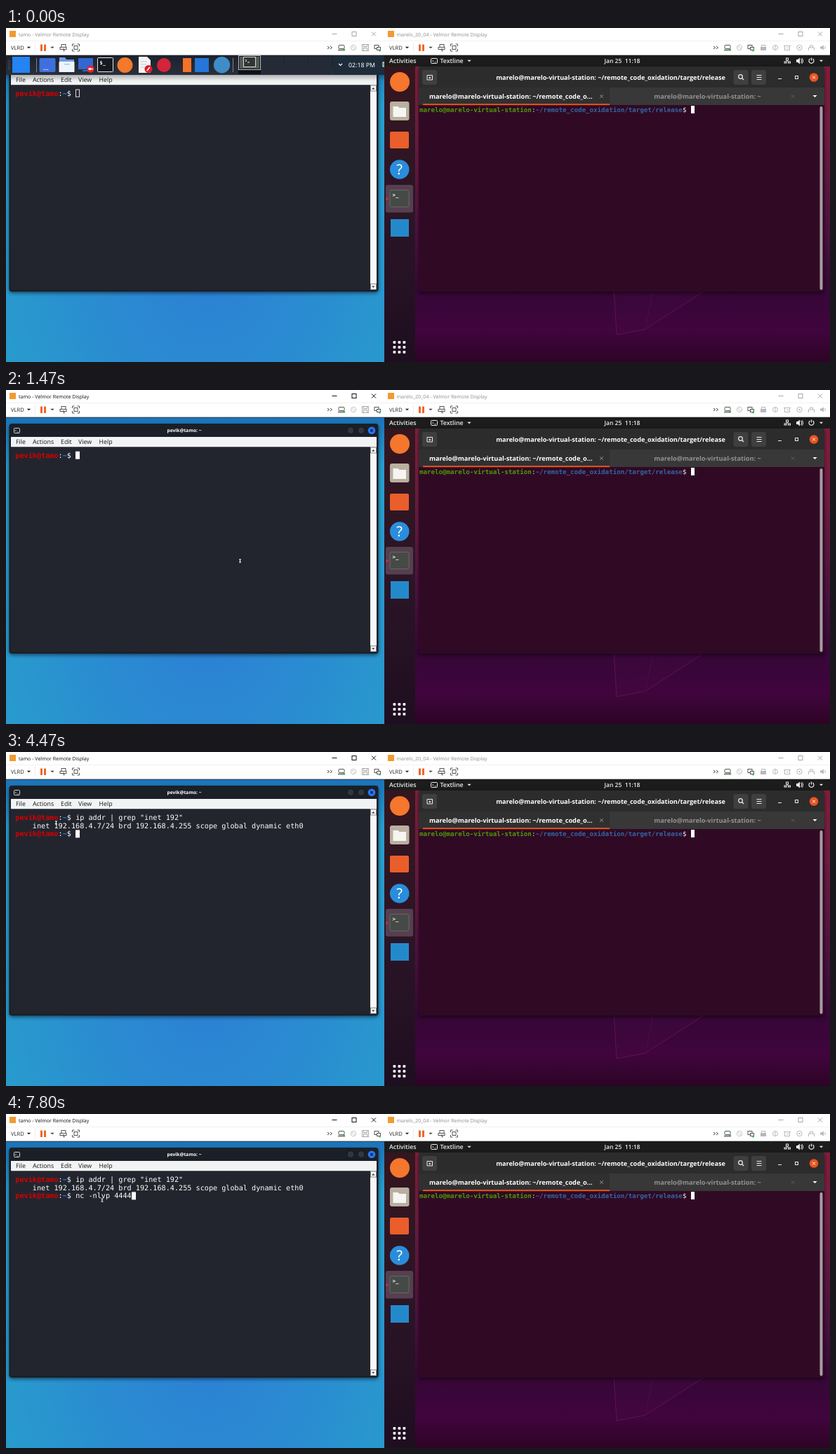
Animation of 1174x477 px, one loop 8 s. Source, as an HTML page:

```html
<!DOCTYPE html>
<html lang="en">
<head>
<meta charset="utf-8">
<title>Two remote desktops</title>
<style>
html, body { margin: 0; width: 100%; height: 100%; overflow: hidden; background: #fff; }
svg { display: block; width: 1174px; height: 477px; text-rendering: geometricPrecision; }
text { white-space: pre; font-family: "Open Sans", "Noto Sans", sans-serif; }
.mono { font-family: "DejaVu Sans Mono", monospace; }
.noto { font-family: "Noto Sans", sans-serif; }
</style>
</head>
<body>
<svg id="stage" viewBox="0 0 1174 477" xmlns="http://www.w3.org/2000/svg"></svg>
<script>
const LOOP = 8000, COL = 6.131, ROW = 11.85, LEFT = 13.3, TOP = 87.3;
const WHITE = '#fff', BODY = '#23252e', RED = '#d60000', BLUE = '#277fff';
const USER = 'pevik@tamo', HOST = 'marelo@marelo-virtual-station', PATH = '~/remote_code_oxidation/target/release';

const rect = (x, y, w, h, fill, more = '') => `<rect x="${x}" y="${y}" width="${w}" height="${h}" fill="${fill}" ${more}/>`;
const box = (x, y, w, h, color, more = '') => rect(x, y, w, h, 'none', `stroke="${color}" ${more}`);
const disc = (x, y, r, fill, more = '') => `<circle cx="${x}" cy="${y}" r="${r}" fill="${fill}" ${more}/>`;
const line = (d, color, w = 1, more = '') => `<path d="${d}" fill="none" stroke="${color}" stroke-width="${w}" ${more}/>`;
const shape = (d, fill) => `<path d="${d}" fill="${fill}"/>`;
const label = (x, y, s, size, fill, more = '') => `<text x="${x}" y="${y}" font-size="${size}" fill="${fill}" ${more}>${s}</text>`;
const down = (x, y, color, r = 2.7) => shape(`M${x - r} ${y - r / 2}h${2 * r}l${-r} ${r}z`, color);
const cross = (x, y, r, color, w = 1) => line(`M${x - r} ${y - r}l${2 * r} ${2 * r}m0 ${-2 * r}l${-2 * r} ${2 * r}`, color, w);
const at = (x, y, body) => `<g transform="translate(${x} ${y})">${body}</g>`;
const bold = 'font-weight="700"', semi = 'font-weight="600"', middle = 'text-anchor="middle"';

const defs = `<defs>
  <radialGradient id="sky" gradientUnits="userSpaceOnUse" cx="285" cy="365" r="320">
    <stop offset="0" stop-color="#2c81d4"/><stop offset=".45" stop-color="#2a8bd1"/><stop offset="1" stop-color="#289dcc"/></radialGradient>
  <linearGradient id="skyTop" x2="0" y2="1"><stop stop-color="#1c72b8"/><stop offset="1" stop-color="#1c72b8" stop-opacity="0"/></linearGradient>
  <linearGradient id="wall" x2="0" y2="1">
    <stop stop-color="#831e38"/><stop offset=".25" stop-color="#721d42"/><stop offset=".6" stop-color="#4a1140"/>
    <stop offset=".78" stop-color="#360737"/><stop offset=".9" stop-color="#40053d"/><stop offset="1" stop-color="#2d0425"/></linearGradient>
  <linearGradient id="dock" x2="0" y2="1"><stop stop-color="#35161f"/><stop offset=".5" stop-color="#2b1527"/><stop offset="1" stop-color="#1e0e20"/></linearGradient>
  <linearGradient id="shade" x2="0" y2="1"><stop stop-color="#000" stop-opacity=".45"/><stop offset="1" stop-color="#000" stop-opacity="0"/></linearGradient>
  <linearGradient id="bar" x2="0" y2="1"><stop stop-color="#1c222d"/><stop offset="1" stop-color="#2a303b"/></linearGradient>
  <filter id="soft" x="-5%" y="-5%" width="110%" height="110%"><feGaussianBlur stdDeviation="2.5"/></filter>
</defs>`;

function controls(x, color) {
  return line(`M${x - 3.5} 8.5h7`, color) + box(x + 25, 5.5, 6, 6, color) + cross(x + 56, 8.5, 3, color);
}

function drive(x, color, dot) {
  return box(x - 4, 24.5, 8, 5, color, 'rx="1"') + line(`M${x - 5} 31.5h10`, color, 1.4) + (dot ? disc(x + 3.5, 31, 1.7, '#4caf50') : '');
}

function screens(x) {
  return box(x - 4, 24.5, 6, 5, '#555') + rect(x - 1, 27, 6, 5, WHITE) + box(x - .5, 27.5, 5, 4, '#555') + disc(x + 3.5, 32, 1.5, '#4caf50');
}

// Host window chrome shared by both viewers
function chrome(x, w) {
  return rect(x, 0, w, 39, WHITE) + line(`M${x} 18.5h${w}`, '#f1f1f1') + rect(x, 38, w, 1, '#b9b9b9')
    + rect(x + 5, 4, 9, 9, '#f29a2e')
    + label(x + 7, 31, 'VLRD', 7.6, '#222') + down(x + 32.5, 28, '#222') + line(`M${x + 41.5} 21v14`, '#eee')
    + rect(x + 49, 23.5, 3, 9.5, '#f0672a') + rect(x + 54, 23.5, 3, 9.5, '#f0672a') + down(x + 66, 28, '#444')
    + box(x + 79, 23.5, 6, 4, '#555') + box(x + 77, 27.5, 9, 3, '#555') + line(`M${x + 82} 29v4l2 -1`, '#555')
    + line(`M${x + 94.5} 26v-3h3m4 0h3v3m0 4v3h-3m-4 0h-3v-3`, '#555') + box(x + 97, 25.5, 5, 5, '#555');
}

const more = x => line(`M${x - 4} 26l2.5 2 -2.5 2m4 -4l2.5 2 -2.5 2`, '#444');
const blocked = x => disc(x, 28, 3.7, 'none', 'stroke="#c4c4c4"') + line(`M${x - 2.5} 25.5l5 5`, '#c4c4c4');

function leftDesk() {
  return rect(0, 39, 539, 438, 'url(#sky)') + rect(0, 39, 539, 70, 'url(#skyTop)') + rect(0, 38, 539, 1.5, '#26323e')
    + rect(4, 50, 527, 329, '#000', 'rx="5" opacity=".45" filter="url(#soft)"') + rect(4.5, 48, 526, 328.5, '#1b1f27', 'rx="4"')
    + box(11.5, 54.5, 8, 7, '#d5d5d5', 'rx="1"') + line('M13 57l1.5 1 -1.5 1m3 1h2', '#d5d5d5', .7)
    + label(254, 60.3, USER + ': ~', 6.7, WHITE, `${semi} ${middle} class="noto"`)
    + [491, 506].map(x => disc(x, 57.7, 5, '#303741', 'stroke="#12151a"')).join('')
    + disc(521, 57.7, 5.3, '#2777ff') + cross(521, 57.7, 1.8, '#10192b', 1.1)
    + rect(7, 67, 521, 14.5, '#f2f3f4')
    + [['File', 14], ['Actions', 38], ['Edit', 78], ['View', 103], ['Help', 132.5]]
      .map(([s, x]) => label(x, 77.2, s, 8.8, '#222', 'class="noto"')).join('')
    + rect(7, 81.5, 512, 292.5, BODY) + rect(519, 81.5, 9, 292.5, '#f9f9f9')
    + box(519.5, 82, 8, 8, '#8c8c8c') + box(519.5, 365.5, 8, 8, '#8c8c8c')
    + shape('M521 87.5h4.6l-2.3 -2.6z', '#333') + down(523.3, 369.7, '#333', 2.3);
}

function taskbar() {
  const cells = [363, 397, 431].map(x => rect(x, 40, 33, 26, '#252b36')).join('');
  return rect(0, 39, 539, 28, 'url(#bar)') + line('M3.5 46v14m2 -14v14', '#515964', 1, 'stroke-dasharray="1 1"')
    + rect(9, 41, 25, 23, '#2583f3') + line('M43.5 43v20', '#7e858e')
    + rect(47.5, 43, 23, 20, '#3e70dd', 'rx="2"') + label(53, 60, '...', 9, WHITE, bold)
    + shape('M76 42h8l2 3h11v18h-21z', '#6f9ee6') + rect(75.5, 48, 22, 15, '#eff4fa', 'rx="1"') + rect(83, 51, 8, 1.5, '#a8c7ec')
    + rect(103, 43, 21, 16, '#3167d2', 'rx="1"') + rect(109, 60, 9, 2, '#3167d2')
    + disc(120.5, 58.5, 5.2, '#df2532') + rect(117.7, 57, 3.8, 3, WHITE) + shape('M121.5 58.5l2 -1.5v3z', WHITE)
    + rect(130.5, 42.5, 22, 20, '#16191f', 'stroke="#e5e5e5" rx="1"') + label(133.5, 52, '$_', 7, WHITE, `${bold} class="mono"`)
    + disc(169.5, 53, 11, '#f3792b')
    + shape('M189 41h12l5 5v18h-17z', '#f4f4f4') + line('M192 48h9m-9 4h8m-8 4h6', '#c9c9c9') + disc(203, 58.5, 5.5, '#d91f2f') + line('M200.8 61l4 -5', WHITE, 1.5)
    + disc(225, 53, 10, '#d3243b') + rect(252, 43, 12, 20, '#f57228') + rect(269, 43, 20, 20, '#2476d9') + disc(307.5, 52.7, 11.7, '#3f8cc9')
    + line('M323.5 43v20', '#7e858e') + cells
    + rect(331, 39, 32, 27, '#0f1217') + box(331.5, 39.5, 31, 20, '#bdbdbd') + rect(333, 41, 28, 17, '#555a57')
    + rect(338.5, 41.5, 17, 14, '#303634', 'stroke="#d6d6d6"') + line('M341 45l2 1.5 -2 1.5m3 1h3', WHITE, .9)
    + rect(466, 39, 73, 28, '#1e2c3a') + line('M474 51l2.5 2.5 2.5 -2.5', WHITE, 1.2)
    + label(488, 56, '02:18 PM', 8.8, WHITE, 'class="noto"') + rect(537, 49, 2, 6, 'none', 'stroke="#fff"')
    + rect(0, 67, 539, 9, 'url(#shade)', 'opacity=".6"');
}

function rightTools() {
  const g = '#b8b8b8';
  return more(1012) + drive(1028, '#555', true) + blocked(1045) + screens(1061)
    + rect(1075, 27, 8, 5, g) + box(1076.5, 24.5, 5, 3, g)
    + disc(1096, 28, 3.5, 'none', `stroke="${g}"`) + line('M1096 25v6', g)
    + box(1109.5, 25.5, 7, 6, g) + line('M1108 25.5h10m-6 3h3', g)
    + disc(1130.5, 28, 3.7, 'none', `stroke="${g}"`) + disc(1130.5, 28, 1.2, g)
    + line('M1143.5 32v-4h8v4m-6 -4v-3h4v3', g) + shape('M1160 26.5h2l3 -2v7l-3 -2h-2z', g) + line('M1166.5 26q2 2 0 4', g);
}

function dock() {
  const dots = [0, 1, 2].flatMap(r => [0, 1, 2].map(c => rect(551.5 + c * 7, 447 + r * 7, 3.8, 3.8, WHITE, 'rx="1"'))).join('');
  return rect(539, 55, 44, 422, 'url(#dock)') + disc(561, 77, 14, '#f5762d')
    + rect(547, 105, 27.5, 27, '#b9b0a0', 'rx="3"') + shape('M551.5 112h7l2 2h9.5v13h-18.5z', '#f7f5f1')
    + rect(547, 148, 27, 24, '#e95e2b', 'rx="2"')
    + disc(560.7, 202, 13.8, '#2a8ddb') + label(560.7, 209.3, '?', 20, WHITE, `${middle} class="noto"`)
    + rect(541, 224, 39, 39.5, '#56404f', 'rx="3"') + rect(547, 231.5, 27, 24, '#464a47', 'rx="2" stroke="#656865"')
    + label(550.5, 241, '&gt;_', 7.5, WHITE, `${bold} class="mono"`) + disc(543, 244, 1.8, '#e3262c')
    + rect(548, 273, 26, 25, '#2489ca') + dots;
}

function rightDesk() {
  const w = '#eee';
  return rect(539, 39, 635, 438, 'url(#wall)')
    + shape('M866 376L870 438 911 430 994 376z', '#57104b22') + line('M866 374L870 438 911 430 996 375', '#5f144d') + line('M911 430L922 375', '#521045', .8)
    + rect(539, 39, 635, 16, '#1c1c1c') + label(546, 50.3, 'Activities', 8.8, w, semi)
    + box(605.5, 43.5, 9, 7, w, 'rx="1"') + line('M607.5 46l1.5 1 -1.5 1m3 .7h2', w, .8)
    + label(618.5, 50.3, 'Textline', 8.8, w, semi) + down(660, 47, w)
    + label(852.5, 50.3, 'Jan 25  11:18', 8.5, w, semi)
    + box(1111.5, 43, 3, 3, w) + box(1109, 48, 3, 2, w) + box(1114.5, 48, 3, 2, w) + line('M1113 46v2', w)
    + shape('M1126 45h2l3 -2.5v9l-3 -2.5h-2z', w) + line('M1132.5 44q2.5 3 0 6m1.3 -7q3.5 4 0 8', w)
    + line('M1145.5 44a3.5 3.5 0 1 0 4 0m-2 -1.5v4', w, 1.2) + down(1161.5, 47, w)
    + rect(588, 57, 578, 322, '#000', 'rx="4" opacity=".5" filter="url(#soft)"') + rect(588, 55, 578, 321.5, '#300a24', 'rx="4"')
    + rect(588, 55, 578, 31, '#2c2c2c', 'rx="4"') + rect(588, 85, 578, 25, '#383838') + rect(588, 85, 272, 25, '#303030')
    + [593, 1036.5, 1062].map(x => rect(x, 60, 21, 21, '#3f3f3f', 'rx="3"')).join('')
    + line('M600 74v-6.5h7.5v6.5zM603.8 69.5v3m-1.5 -1.5h3', w)
    + disc(1046.5, 69.5, 2.8, 'none', `stroke="${w}" stroke-width="1.2"`) + line('M1048.5 71.5l2.5 2.5', w, 1.3)
    + line('M1069.5 67.5h7m-7 3h7m-7 3h7', w)
    + label(861.5, 73.6, `${HOST}: ${PATH}`, 9.05, WHITE, `${bold} ${middle}`)
    + line('M1100 72.5h5', w) + box(1124.5, 68.5, 4, 4, w) + disc(1151, 70.5, 6.3, '#e95420') + cross(1151, 70.5, 2, WHITE)
    + label(603, 100.6, `${HOST}: ~/remote_code_o…`, 9.2, WHITE, bold) + cross(848.5, 97.5, 2.2, '#aaa', .9)
    + label(999.5, 100.6, `${HOST}: ~`, 9.2, '#929292', `${bold} ${middle}`) + cross(1121, 97.5, 2.2, '#606060', .9)
    + down(1152.5, 97.5, WHITE, 3) + rect(594, 108.2, 266, 2, '#e95420')
    + `<text class="mono" x="589" y="120" font-size="9.178" ${bold}><tspan fill="#4e9a06">${HOST}</tspan><tspan fill="#ddd" font-weight="400">:</tspan><tspan fill="#3465a4">${PATH}</tspan><tspan fill="#eee" font-weight="400">$</tspan></text>`
    + rect(976, 111, 5, 11, WHITE) + rect(1159.5, 112, 4, 262, '#aa9ba6', 'rx="2"');
}

// One cell run; swapped colours when selected
function run(row, col, s, color, heavy, picked) {
  const x = LEFT + col * COL, y = TOP + row * ROW;
  return (picked ? rect(x, y, s.length * COL, ROW, color) : '')
    + label(x, y + 9.4, s, 10.184, picked ? BODY : color, `class="mono" ${heavy ? bold : ''}`);
}

function prompt(row, picked) {
  return run(row, 0, USER, RED, true, picked) + run(row, 10, ':', WHITE, false, picked)
    + run(row, 11, '~', BLUE, true, picked) + run(row, 12, '$ ', WHITE, false, picked);
}

const SEARCH = 'ip addr | grep "inet 192"';
const RESULT = '    inet 192.168.4.7/24 brd 192.168.4.255 scope global dynamic eth0';

function typed(t) {
  if (t < 3000) return SEARCH.slice(0, t < 1870 ? 0 : t < 2130 ? 5 : t < 2400 ? 13 : 25);
  return t < 7330 ? '' : t < 7600 ? SEARCH : t < 7800 ? 'clear' : 'nc -nlvp 4444';
}

function shell(t, px) {
  const done = t >= 3000, row = done ? 2 : 0, s = typed(t), end = 14 + s.length;
  const both = t >= 5200 && t < 5500, picking = t >= 5070 && t < 6600;
  let out = '';
  if (done) {
    out += prompt(0) + run(0, 14, SEARCH, WHITE) + run(1, 0, RESULT, WHITE);
    if (picking) {
      const reach = Math.round((px - LEFT) / COL);
      const stop = both ? 81 : t >= 5930 ? 23 : Math.max(10, Math.min(22, reach));
      out += run(1, 9, RESULT.slice(9, stop).padEnd(stop - 9), WHITE, false, true);
    }
  }
  const sel = picking && both, x = Math.round(LEFT + end * COL), y = TOP + row * ROW;
  out += prompt(row, sel) + run(row, 14, s, WHITE);
  if (sel) return out + rect(x, y, COL, ROW, BODY) + rect(x + COL, y, COL, ROW, WHITE);
  return out + (t < 1130 ? box(x + .5, y + .7, 5, 10.3, '#ddd') : rect(x, y + .4, 6, 11, WHITE));
}

// Pointer stops: time, x, y
const STOPS = [
  [130, 1109, 466], [600, 585, 288], [930, 585, 288], [1270, 333.5, 244], [3330, 333.5, 244],
  [3800, 13, 118], [4070, 72, 101], [4400, 72, 101], [4530, 71, 101], [4670, 71, 101], [4730, 70, 101],
  [5000, 70, 101], [5270, 121, 107], [5500, 135, 112], [5870, 149, 102], [6000, 149, 102], [6070, 149, 101],
  [6200, 149, 101], [6400, 140.5, 123], [6730, 140.5, 123], [6800, 137, 123], [LOOP, 137, 123]
];

function pointer(t) {
  const i = Math.max(1, STOPS.findIndex(p => p[0] > t)), [a, b] = [STOPS[i - 1], STOPS[i]];
  const u = Math.max(0, Math.min(1, (t - a[0]) / (b[0] - a[0]))), k = u * u * (3 - 2 * u);
  return [a[1] + (b[1] - a[1]) * k, a[2] + (b[2] - a[2]) * k];
}

const ARROW = `<path d="M0 0v9.2l2.1 -2 1.5 3.5 1.7 -.7 -1.5 -3.4h2.9z" fill="#fff" stroke="#111" stroke-width=".7"/>`;
const BEAM = line('M-1.5 -2h3M0 -2v4M-1.5 2h3', WHITE);

const stage = document.getElementById('stage');
stage.innerHTML = defs + leftDesk() + '<g id="shell"></g><g id="panel">' + taskbar() + '</g>'
  + chrome(0, 539) + '<g id="head"></g>' + more(462) + drive(478, '#555', true) + blocked(495)
  + box(507.5, 23.5, 9, 9, '#aaa') + box(509.5, 23.5, 5, 3, '#aaa') + box(509.5, 28.5, 5, 4, '#aaa') + screens(529)
  + chrome(539, 635) + label(556.5, 11.7, 'marelo_20_04 - Velmor Remote Display', 7.1, '#8c8c8c') + controls(1104, '#a5a5a5')
  + rightTools() + rightDesk() + dock() + '<g id="mouse"></g>';

const [shellNode, panel, head, mouse] = ['shell', 'panel', 'head', 'mouse'].map(id => document.getElementById(id));
const tick = n => Math.round(n * 20 / 3) * 10;

function step(t) {
  let n = Math.ceil(t * .015) + 1;
  while (tick(n) > t) n--;
  return tick(n);
}

let last = -1;
function draw(t) {
  if (t === last) return;
  last = t;
  const [x, y] = pointer(t), active = t >= 130;
  shellNode.innerHTML = shell(t, x);
  panel.style.display = t < 1400 ? '' : 'none';
  head.innerHTML = label(18, 11.7, 'tamo - Velmor Remote Display', 7.1, active ? '#111' : '#8c8c8c') + controls(468, active ? '#111' : '#a5a5a5');
  mouse.innerHTML = active ? at(x, y, x > 530 || t < 1000 ? ARROW : BEAM) : '';
}

const start = performance.now();
function frame() {
  draw(step((performance.now() - start) % LOOP));
  requestAnimationFrame(frame);
}
frame();
</script>
</body>
</html>
```
